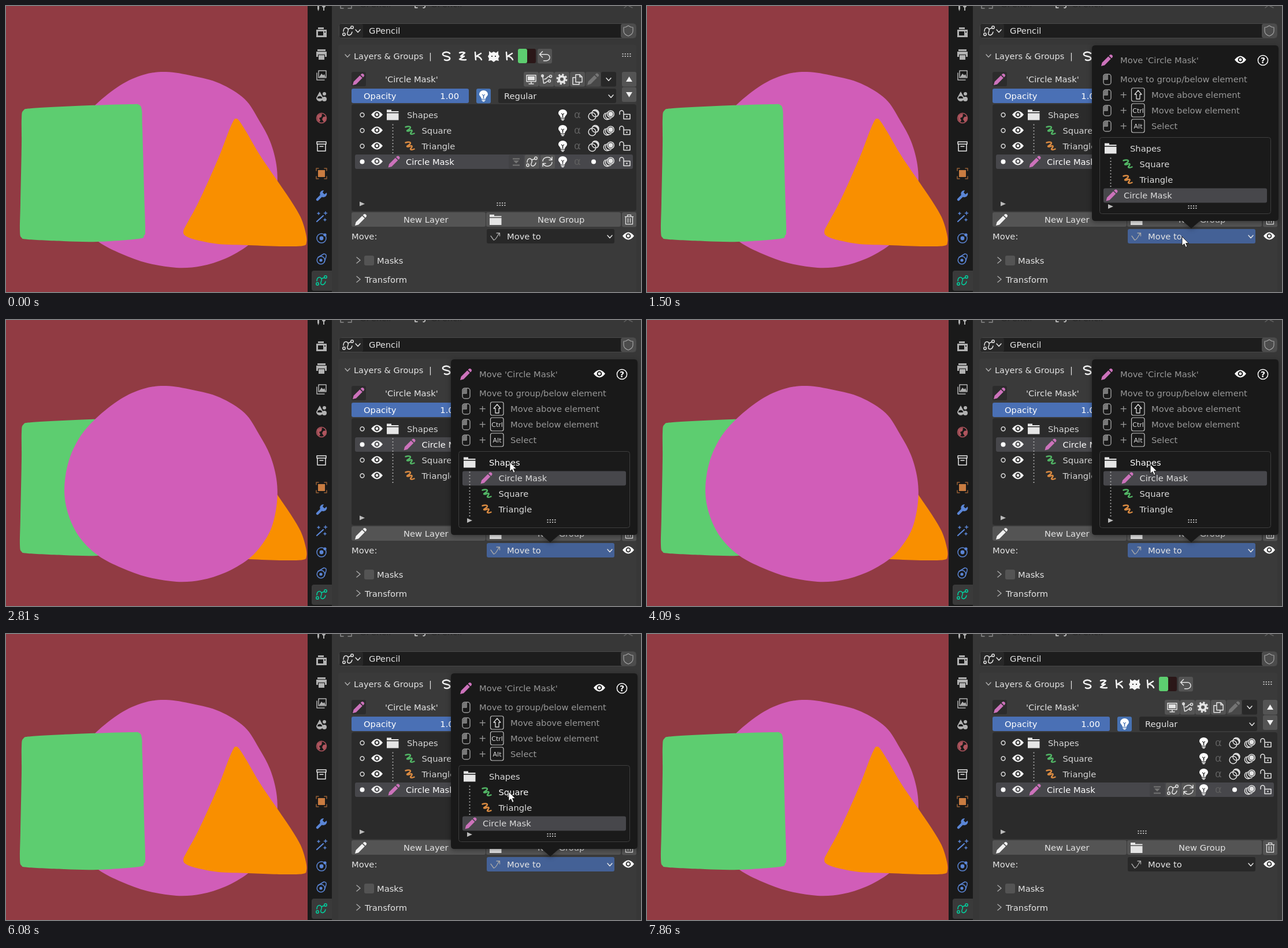
An HTML page for the animation above (8340 ms loop, 1099 px wide and 495 px high).

```html
<!DOCTYPE html>
<html lang="en">
<head>
<meta charset="utf-8">
<title>Layer masks</title>
<style>
html, body { margin: 0; width: 100%; height: 100%; overflow: hidden; background: #383838; }
svg { display: block; width: 1099px; height: 495px; }
text { font-family: "DejaVu Sans", sans-serif; white-space: pre; }
.line { fill: none; stroke: currentColor; stroke-width: 1.5; stroke-linejoin: round; stroke-linecap: round; }
.fill { fill: currentColor; }
</style>
</head>
<body>
<svg id="stage" viewBox="0 0 1099 495"></svg>
<script>
const LOOP = 8340;
const PINK = '#d15db8', GREEN = '#5dcd70', ORANGE = '#f98f00';
const BLUE = '#4772b3', GREY = '#545454', DARK = '#282828', INK = '#e4e4e4', DIM = '#989898';
const PEN = '#cc72bb';

// ---- drawing helpers ----
const text = (x, y, s, fill = INK, size = 14.7, anchor = 'start', more = '') =>
  `<text x="${x}" y="${y + 5.3}" fill="${fill}" font-size="${size}" text-anchor="${anchor}" ${more}>${s}</text>`;
const box = (x, y, w, h, fill, r = 3, more = '') =>
  `<rect x="${x}" y="${y}" width="${w}" height="${h}" rx="${r}" fill="${fill}" ${more}/>`;
const icon = (id, x, y, color = INK) => `<use href="#${id}" x="${x}" y="${y}" color="${color}"/>`;
const line = (d, more = '') => `<path class="line" d="${d}" ${more}/>`;
const fill = (d, more = '') => `<path class="fill" fill-rule="evenodd" d="${d}" ${more}/>`;
const ring = (x, y, r, more = '') => `<circle class="line" cx="${x}" cy="${y}" r="${r}" ${more}/>`;
const dot = (x, y, r, more = '') => `<circle class="fill" cx="${x}" cy="${y}" r="${r}" ${more}/>`;
const wide = w => `style="stroke-width:${w}px"`;
const hide = 'style="display:none"';

function blob(p, color) {
  const n = p.length, at = i => p[(i + n) % n];
  let d = 'M' + p[0];
  for (let i = 0; i < n; i++) {
    const [a, b, c, e] = [at(i - 1), at(i), at(i + 1), at(i + 2)];
    d += `C${b[0] + (c[0] - a[0]) / 6} ${b[1] + (c[1] - a[1]) / 6} ${c[0] - (e[0] - b[0]) / 6} ${c[1] - (e[1] - b[1]) / 6} ${c}`;
  }
  return `<path d="${d}Z" fill="${color}"/>`;
}

function grip(x, y) {
  let s = '';
  for (let i = 0; i < 8; i++) s += box(x - 7.5 + (i % 4) * 4.3, y - 3 + (i > 3) * 4, 2, 2, '#bdbdbd', 0);
  return s;
}

// ---- icons, all centred on 0,0 ----
const icons = {
  pencil: fill('M-10 10L-8.4 4L2.4-6.8L6.8-2.4L-4 8.4ZM3.6-8L5.2-9.6Q7-10.8 9-9T9.6-5.2L8-3.6Z'),
  eye: fill('M-10 0Q0-13 10 0Q0 13-10 0ZM4.4 0A4.4 4.4 0 1 0-4.4 0A4.4 4.4 0 1 0 4.4 0Z') + dot(0, 0, 2.4),
  folder: fill('M-10-9H-2V-6.5H10.5V-4.5H-10ZM-10-3H10.5V9H-10Z'),
  squiggle: line('M-7-6C-2-8 3-7 1-4S-6 0-4 1S3-2 4 0S0 5 2 6S6 6 8 5', wide(2.5)),
  data: ring(-7, 6, 2.2) + line('M-8 1C-8-5-3-8 0-3C2 1-3 3-1 6C1 9 6 7 7 2') + ring(7, -6, 2.2) + line('M0-3L5-5'),
  bulb: fill('M-3.6 5C-3.6 1.5-7.5 0-7.5-3A7.5 6.6 0 0 1 7.5-3C7.5 0 3.6 1.5 3.6 5ZM-.8 4V-.2L-2.8-2.6L-2-3.2L0-1.2L2-3.2L2.8-2.6L.8-.2V4Z') +
    line('M-2.6 7H2.6M-1.2 9H1.2', wide(1.6)),
  mask: ring(-2.5, 2.5, 6.4) + fill('M-3-5A6.4 6.4 0 1 1 5 4A6 6 0 0 0-3-5Z') + ring(3, -3, 6),
  onion: line('M-6-3A6 6 0 1 0 1 7M-3-4A6 6 0 0 0 4 6') + ring(3.5, -1.5, 5.8) + dot(3.5, -1.5, 4),
  lock: line('M-2-1H9V7H-2ZM-2-1V-4A3.4 3.4 0 0 0-9-4V-1') + dot(3.5, 3, 1.3),
  down: line('M-4-2L0 2.5L4-2'),
  right: line('M-3-5L3 0L-3 5'),
  tri: fill('M-4-4L5 0L-4 4Z'),
  mouse: line('M-6-4A4 4 0 0 1-2-9H3A4 4 0 0 1 7-5V5A4 4 0 0 1 3 9H-2A4 4 0 0 1-6 5ZM-6 0H1V-9') + fill('M-5-1V-5Q-5-8-2-8H0V-1Z', 'opacity=".75"'),
  bent: line('M-8-1L-3 6C1 6 3-1 7-6M2-6H7.5V-1', wide(1.3)),
  back: line('M-4-8L-9-3L-4 2M-9-3H3A5 5 0 0 1 3 8H-2'),
  screen: line('M-8-7H8V4H-8ZM-4 8H4M0 4V8') + box(-6, -5, 12, 7, 'currentColor', 0),
  nodes: line('M-7-7L-5 7M-4 0C2 0 0-5 5-5M-5 7C0 7 0 3 3 3') + ring(-7, -6, 1.8) + ring(7, -5, 2) + ring(5, 3, 2),
  gear: ring(0, 0, 5, wide(4)) + ring(0, 0, 8, 'style="stroke-width:3px;stroke-linecap:butt" stroke-dasharray="3.2 3.08"'),
  pages: line('M-3-8H4L8-4V5H-3ZM4-8V-4H8M-3-3H-8V9H3V6'),
  trash: line('M-7-5H7M-3-5V-8H3V-5M-6-5V8H6V-5M-2-2V5M2-2V5', wide(1.3)),
  shield: line('M0-9Q4-6 8-6V0Q8 6 0 9Q-8 6-8 0V-6Q-4-6 0-9Z', wide(1.2)),
  merge: fill('M-6-6H6V-4H-6ZM-5-2H5L0 3ZM-6 5H6V7H-6Z'),
  cycle: line('M-8-1A8 7 0 0 1 7-4M8 1A8 7 0 0 1-7 4M8-8V-3H3M-8 8V3H-3'),
  help: ring(0, 0, 8.6) + text(0, 0, '?', 'currentColor', 14, 'middle', 'font-weight="bold"')
};

// ---- canvas on the left ----
const disc = blob([[277, 114], [323, 121], [370, 134], [413, 161], [438, 198], [457, 234], [468, 275], [469, 315], [460, 358],
  [442, 390], [418, 415], [380, 437], [338, 450], [295, 453], [245, 445], [200, 429], [160, 408], [128, 377], [108, 337],
  [101, 294], [108, 246], [127, 204], [156, 170], [198, 137], [238, 119]], PINK);
const square = blob([[27, 195], [30, 181], [45, 177], [120, 173], [215, 170], [230, 171], [235, 180], [236, 210], [239, 320],
  [241, 386], [239, 397], [229, 403], [158, 408], [100, 407], [38, 404], [27, 401], [24, 389], [25, 340], [27, 240]], GREEN);
const triangle = blob([[394, 198], [398, 195], [403, 198], [416, 218], [440, 259], [470, 303], [495, 340], [511, 368], [519, 394],
  [520, 409], [514, 415], [480, 416], [420, 414], [368, 412], [330, 405], [311, 398], [307, 390], [313, 377], [331, 344],
  [352, 299], [371, 255], [385, 218]], ORANGE);
const art = box(0, 0, 522, 495, '#913b43', 0) + `<g id="under">${disc}</g>` + square + triangle + `<g id="over">${disc}</g>`;

// ---- column of tabs ----
const tab = (y, color, s) => `<g transform="translate(546 ${y})" color="${color}">${s}</g>`;
const soft = '#b2b2b2', sky = '#5b86d6';
const tabs = box(522, 0, 42, 495, '#1a1a1a', 0) + box(529, 458, 42, 35, '#3a3a3a', 4) + box(564, 0, 535, 495, '#373737', 0) +
  tab(2, soft, fill('M-7-8H-4V3L-5.5 7L-7 3ZM1-6Q4-2 7-6V-1L5 1V6H3V1L1-1Z')) +
  tab(46, soft, fill('M-9-5H9V8H-9ZM-6-2V5H3V-2ZM5-2V0H7V-2Z') + fill('M-6-9H4V-6H-6Z')) +
  tab(84, soft, fill('M-7-9H7V-6H-7ZM-9-5H9V4H6V0H-6V4H-9Z') + fill('M-5 1H5V9H-5Z')) +
  tab(120, soft, line('M-8-4V8H5') + line('M-5-8H8V4H-5Z') + fill('M-4 3L0-3L3 0L5-2L7 3Z')) +
  tab(157, soft, fill('M-3-9L3 2A6 6 0 1 1-9 2ZM1 3A4 4 0 1 0-7 3Z') + dot(5, -5, 3) + dot(5, 4, 4)) +
  tab(194, '#b0555e', ring(0, 0, 8.5) + fill('M-7-4Q-2-9 1-7L0-2L-4 0L-2 4L-4 7Q-9 2-7-4ZM3-2L8-3Q9 3 4 7L1 2Z')) +
  tab(243, '#e8e8e8', line('M-8-8H8V-4H-8ZM-7-4V8H7V-4M-3 0H3')) +
  tab(290, '#c97c41', box(-6, -6, 12, 12, 'currentColor', 0) + line('M-9-5V-9H-5M9-5V-9H5M-9 5V9H-5M9 5V9H5', 'opacity=".7"')) +
  tab(328, sky, line('M-7 7L2-2', wide(4.5)) + fill('M9-5A6 6 0 1 1 4-9L2-5L5-2Z')) +
  tab(365, sky, line('M-8 8L3-2', wide(2.2)) + line('M-5-8V-4M-7-6H-3M7-9V-4M4.5-6.5H9.5M6 3V7M4 5H8')) +
  tab(402, sky, ring(0, 0, 8) + dot(0, 0, 3.4) + dot(6, -6, 2.6)) +
  tab(438, sky, ring(-1, 2, 6.8) + dot(-1, 2, 2.6) + line('M-6-3L4-9Q9-9 8-4L5 5')) +
  tab(475, '#00d3a0', '<use href="#data"/>');

// ---- properties panel ----
const button = (x, y, id, w = 26, bg = GREY, c = INK) => box(x, y, w, 25.5, bg) + icon(id, x + w / 2, y + 12.7, c);
const letter = (x, d) => `<g transform="translate(${x} 87)" color="#f4f4f4">${line(d, wide(2.5))}</g>`;
const kStroke = 'M-5-7L-4 6M5-5L-3 0Q3 0 6 6';
const panel = box(575, 67, 516, 440, '#3a3a3a', 4) +
  `<g opacity=".6">${text(612, -3, 'GPencil', '#1c1c1c')}${text(735, -3, 'GPencil', '#1c1c1c')}</g>` +
  `<g color="#8a8a8a">${line('M579 0V4H584M592 4H598V0')}${line('M1070 3L1074 0M1078 0L1084 3', 'opacity=".5"')}</g>` +
  `<g color="#ddd">${line('M708 0V3H712M722 3A2 2 0 0 0 724-1')}</g>` +
  box(576.5, 30.5, 514, 25, '#1d1d1d', 4, 'stroke="#484848"') + box(577, 31, 41, 24, DARK) + icon('data', 592, 43) + icon('down', 609, 43) +
  text(628, 43, 'GPencil') + box(1064, 31, 26, 24, '#4c4c4c') + icon('shield', 1077, 43, '#a2a2a2') +
  icon('down', 591, 86, '#aaa') + text(602, 87, 'Layers &amp; Groups', INK, 14.5) + text(732, 87, '|') +
  letter(762, 'M6-5C2-9-7-7-6-3S5-1 6 3S0 8-3 6') + letter(790, 'M-5-6Q0-8 4-6L-3 0H3L-5 5Q0 7 6 6') +
  letter(817, kStroke) + letter(871, kStroke) +
  `<g transform="translate(844 87)" color="#f4f4f4">${fill('M-8-9L-4-6L0-8L4-6L8-9V-3L10 0L8 4L9 8L4 7L0 10L-4 7L-9 8L-8 4L-10 0L-8-3ZM-4-1V1H-2V-1ZM2-1V1H4V-1Z')}</g>` +
  box(886, 74, 31, 25, '#2b1718') + box(886, 74, 16, 25, GREEN) + button(920, 74, 'back', 25) + grip(1074, 85) +
  box(598, 114, 25, 25, '#2c2c2c') + icon('pencil', 610, 127, PEN) + text(656, 127, "'Circle Mask'") +
  button(896, 114, 'screen') + button(922.5, 114, 'nodes') + button(949, 114, 'gear') + button(976, 114, 'pages') +
  button(1003, 114, 'pencil', 26, '#484848', '#747474') + button(1030, 114, 'down', 26, DARK) +
  box(1066, 114, 25, 25.5, GREY) + box(1066, 140.5, 25, 25.5, GREY) +
  `<path d="M1073 131L1078.5 122L1084 131ZM1073 149L1078.5 158L1084 149Z" fill="#eee"/>` +
  box(598, 143, 203, 25, '#4a70b5') + text(619, 156, 'Opacity', '#fff') + text(784, 156, '1.00', '#fff', 14.7, 'end') +
  button(814, 143, 'bulb', 25, BLUE, '#fff') + box(852, 143, 204, 25, DARK) + text(862, 156, 'Regular') + icon('down', 1047, 156) +
  box(598, 170, 493, 185, '#2b2b2b', 4) + '<g id="rows"></g>' + icon('tri', 616, 342.5, '#bbb') + grip(857, 343) +
  box(598, 357, 232, 25, GREY) + icon('pencil', 614, 370, '#f0f0f0') + text(688, 370, 'New Layer') +
  box(831, 357, 233, 25, GREY) + icon('folder', 847, 370) + text(920, 370, 'New Group') + button(1066, 357, 'trash', 25) +
  text(598, 399, 'Move:') + `<rect id="pick" x="832" y="386" width="221" height="25" rx="3"/>` + icon('bent', 847, 399, '#a8a8a8') +
  text(867, 399, 'Move to') + icon('down', 1045, 399) + icon('eye', 1077, 398, '#fff') +
  icon('right', 610, 440, '#aaa') + box(620, 432, 17, 17, GREY) + text(642, 440.5, 'Masks') +
  icon('right', 610, 473, '#aaa') + text(621, 473.5, 'Transform');

// ---- popup ----
const hint = (y, key, label) => icon('mouse', 796, y, DIM) + (key === '' ? text(819, y, label, DIM) :
  text(818, y, '+', DIM, 16) + box(838.5, y - 12, 22.5, 23, 'none', 3, 'stroke="#c4c4c4" stroke-width="1.2"') +
  (key === 'up' ? `<path class="line" color="#ddd" d="M850 ${y - 8}L856 ${y - 1}H853V${y + 7}H847V${y - 1}H844Z" style="stroke-width:1.3px"/>`
    : text(850, y - 1, key, '#ddd', 11, 'middle')) + text(873, y, label, DIM));
const popup = `<g id="popup" ${hide}><path d="M776 68H1087Q1093 68 1093 74V366Q1093 372 1087 372H957L942 385L927 372H776Q770 372 770 366V74Q770 68 776 68Z"
  fill="#191919" style="filter:drop-shadow(0 2px 4px rgba(0,0,0,.35))"/>` +
  icon('pencil', 796, 94, PEN) + text(819, 94, "Move 'Circle Mask'", DIM) + icon('eye', 1027, 93, '#fff') + icon('help', 1066, 94, '#fff') +
  hint(127, '', 'Move to group/below element') + hint(154, 'up', 'Move above element') +
  hint(181, 'Ctrl', 'Move below element') + hint(208, 'Alt', 'Select') +
  box(783.5, 227.5, 296, 132, '#1a1a1a', 4, 'stroke="#3e3e3e"') + '<g id="picks"></g>' +
  icon('tri', 802, 347, '#bbb') + grip(944, 348) + '</g>';

const cursor = `<path id="cursor" d="M0 0V16L3.8 12.6L6.4 18.4L9 17.2L6.5 11.6H11.4Z" fill="#fff" stroke="#111" stroke-width=".9" ${hide}/>`;

const defs = Object.entries(icons).map(([id, s]) => `<g id="${id}">${s}</g>`).join('');
const $ = id => document.getElementById(id);
$('stage').innerHTML = `<defs>${defs}</defs>` + art + tabs + panel + popup + cursor;

// ---- layer lists: ">" marks a child ----
const orders = [
  ['Shapes', '>Square', '>Triangle', 'Circle Mask'],
  ['Shapes', '>Circle Mask', '>Square', '>Triangle'],
  ['Circle Mask', 'Shapes', '>Square', '>Triangle']
];
const looks = { Shapes: ['folder', '#e6e6e6'], Square: ['squiggle', '#52b565'], Triangle: ['squiggle', '#d98a41'], 'Circle Mask': ['pencil', PEN] };

// x is the folder position, gap the distance to a group's label
function entry(x, y, item, color, gap) {
  const child = item[0] === '>', name = item.replace('>', ''), [id, tint] = looks[name];
  const group = name === 'Shapes';
  const shift = group ? 0 : child ? 29.5 : 2.5;
  const guide = child ? `<path d="M${x + .5} ${y - 11}V${y + 14}" stroke="#a5a5a5" stroke-width="1.8" stroke-dasharray="2 3.4"/>` : '';
  return guide + icon(id, x + shift, y, tint) + text(x + (group ? gap : child ? 50.5 : 23), y + .2, name, color);
}

const rowsHtml = order => order.map((item, i) => {
  const y = 188.5 + 27 * i, on = item.endsWith('Mask');
  const extra = on ? box(870, y - 12, 26, 24, '#424245') + icon('merge', 883, y, '#747474') +
    box(898, y - 12, 25, 24, '#565656') + icon('data', 910, y) + box(925, y - 12, 25, 24, '#565656') + icon('cycle', 937, y) : '';
  return (on ? box(604, y - 12.5, 481, 25, '#47474b') : '') +
    `<circle cx="616.5" cy="${y}" r="${on ? 4 : 3.4}" fill="${on ? '#fff' : 'none'}" stroke="#ddd" stroke-width="${on ? 0 : 1.5}"/>` +
    icon('eye', 642, y - .5, '#f2f2f2') + entry(669, y, item, on ? '#fff' : '#d6d6d6', 25) + extra +
    icon('bulb', 963.5, y, '#fff') + text(989, y, 'α', '#5e5e5e', 18, 'middle') +
    (on ? `<circle cx="1017" cy="${y}" r="4" fill="#fff"/>` : icon('mask', 1017, y)) +
    icon('onion', 1043, y) + icon('lock', 1071, y);
}).join('');

const picksHtml = (order, hover) => order.map((item, i) => {
  const y = 246.5 + 27 * i;
  return (item.endsWith('Mask') ? box(790, y - 12, 283, 25, '#47474b') : '') + entry(802, y, item, i === hover ? '#fff' : '#dcdcdc', 34);
}).join('');

// ---- timeline ----
const keys = [
  [535, 927, 504], [930, 926, 399], [2020, 926, 399], [2170, 936, 350], [2400, 872, 246],
  [3640, 872, 246], [3880, 879, 264], [4150, 870, 248], [4860, 870, 248], [5010, 879, 305],
  [5130, 880, 326], [5290, 876, 303], [5460, 870, 273], [6810, 870, 273], [7000, 876, 330],
  [7190, 889, 438], [7370, 900, 489], [7780, 900, 489], [7860, 945, 497]
];

// velocity at a key; zero where the pointer rests
function slope(i, k) {
  const a = keys[i - 1], b = keys[i], c = keys[i + 1];
  if (!a || !c || (b[1] === a[1] && b[2] === a[2]) || (b[1] === c[1] && b[2] === c[2])) return 0;
  return (c[k] - a[k]) / (c[0] - a[0]);
}

function pointer(t) {
  const i = keys.findIndex((k, n) => n < keys.length - 1 && t >= k[0] && t < keys[n + 1][0]);
  if (i < 0) return null;
  const a = keys[i], b = keys[i + 1], d = b[0] - a[0], u = (t - a[0]) / d, v = 1 - u;
  return [1, 2].map(k => a[k] * v * v * (1 + 2 * u) + b[k] * u * u * (3 - 2 * u) +
    d * u * v * (slope(i, k) * v - slope(i + 1, k) * u));
}

const show = (id, on) => { $(id).style.display = on ? '' : 'none'; };
let lastRows, lastPicks;

function update(t) {
  const state = t >= 2810 && t < 4520 ? 1 : t >= 4520 && t < 6080 ? 2 : 0;
  const open = t >= 1230 && t < 7310;
  const p = pointer(t);
  const row = p && open ? Math.floor((p[1] - 233) / 27) : -1;
  const hover = row >= 0 && row < 4 ? row : -1;

  show('under', state === 0);
  show('over', state !== 0);
  show('popup', open);
  show('cursor', !!p);
  if (p) $('cursor').setAttribute('transform', `translate(${p[0].toFixed(2)} ${p[1].toFixed(2)})`);
  $('pick').setAttribute('fill', open ? '#446196' : p && p[1] < 411 ? '#2e2e2e' : DARK);

  if (state !== lastRows) $('rows').innerHTML = rowsHtml(orders[state]);
  if (state + '/' + hover !== lastPicks) $('picks').innerHTML = picksHtml(orders[state], hover);
  lastRows = state;
  lastPicks = state + '/' + hover;
}

const start = performance.now();
function frame(now) {
  update(Math.max(0, now - start) % LOOP);
  requestAnimationFrame(frame);
}
update(0);
requestAnimationFrame(frame);
</script>
</body>
</html>
```
